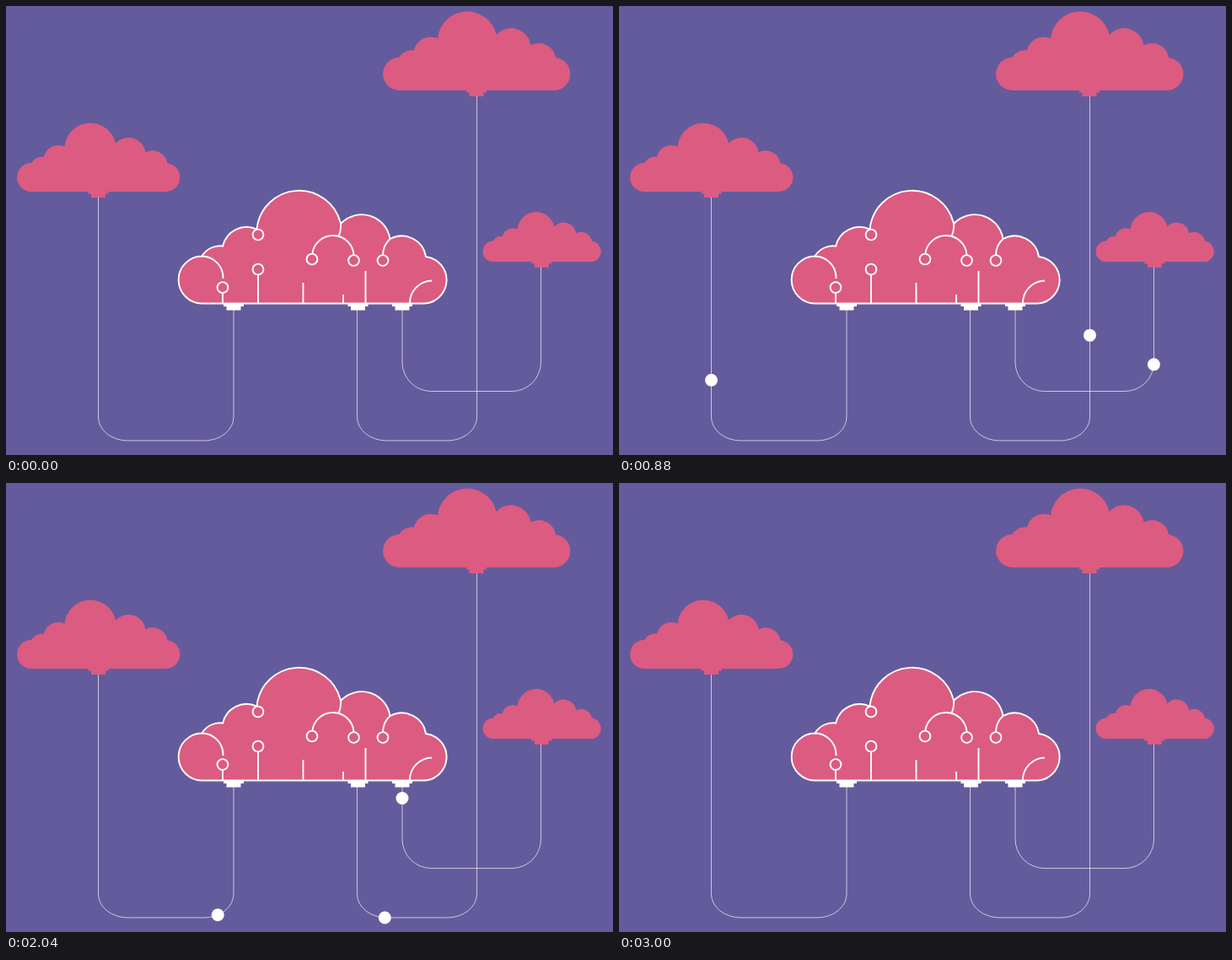
Recreate the animation shown at these times as an HTML page. Size 720 px wide and 532 px high, loop 8000 ms.

```html
<!DOCTYPE html>
<html lang="en">
<head>
<meta charset="utf-8">
<title>Connected clouds</title>
<style>
  html, body { margin: 0; height: 100%; overflow: hidden; background: #645b9c; }
  svg { display: block; width: 100vw; height: 100vh; }
  .wire { fill: none; stroke: #fff; stroke-opacity: .66; }
  .pink { fill: #dc5b81; }
  .white { fill: #fff; }
  .ink { fill: none; stroke: #fff; stroke-width: 1.9; }
  .node { fill: #dc5b81; stroke: #fff; stroke-width: 1.9; }
</style>
</head>
<body>
<svg viewBox="0 0 720 532">
  <defs>
    <path id="cloud" d="M233 352.5A28 28 0 0 1 232.3 296.5A25 25 0 0 1 257.2 284.5A29 29 0 0 1 297.5 264.5A50.5 50.5 0 0 1 397 258A34 34 0 0 1 455.5 276A29 29 0 0 1 498 297A27.85 27.85 0 0 1 494 352.5Z"/>
    <path id="plug" d="M-12 0H12V4H8.5V8.5H-8.5V4H-12Z"/>
  </defs>
  <rect width="720" height="532" fill="#645b9c"/>
  <g id="wires"></g>
  <g id="dots"></g>
  <g id="small" class="pink"></g>
  <use href="#cloud" class="node"/>
  <path class="ink" d="M232.3 296.5A25.5 25.5 0 0 1 257.5 323M257 340V352M299 318V352M352.5 328V352M400 342V352M426.5 314V352
    M363.3 294A24.7 24.7 0 0 1 412.5 295M397 258Q397.8 266 394.5 273M455.5 276Q447.5 283 447 295M479 352A26.5 26.5 0 0 1 505 325.5"/>
  <g id="nodes"></g>
  <g id="plugs" class="white"></g>
</svg>
<script>
const LOOP = 8000;
const $ = id => document.getElementById(id);

function add(parent, tag, attrs) {
  const el = document.createElementNS('http://www.w3.org/2000/svg', tag);
  for (const k in attrs) el.setAttribute(k, attrs[k]);
  return parent.appendChild(el);
}

// Satellite clouds: left edge, top edge, scale, plug x, plug y
[[13, 138.5, .608, 109.5, 218.5], [447, 6.3, .699, 558, 98.5], [565.5, 244, .441, 635.3, 301.3]]
  .forEach(([x, y, s, px, py]) => {
    add($('small'), 'use', { href: '#cloud', transform: `translate(${x} ${y}) scale(${s}) translate(-204.5 -218.5)` });
    add($('small'), 'use', { href: '#plug', x: px, y: py });
  });

[[257, 333.5], [299, 271], [299, 312], [363, 300], [412.5, 301.5], [447, 301.5]]
  .forEach(([cx, cy]) => add($('nodes'), 'circle', { cx, cy, r: 6.4, class: 'node' }));

[270, 417.5, 470].forEach(x => add($('plugs'), 'use', { href: '#plug', x, y: 352 }));

// U-shaped wire, both ends hidden behind clouds
function wire(x1, y1, x2, floor, rx, ry) {
  const dir = Math.sign(x2 - x1), sweep = dir > 0 ? 0 : 1, bend = floor - ry;
  return `M${x1} ${y1}V${bend}A${rx} ${ry} 0 0 ${sweep} ${x1 + dir * rx} ${floor}` +
    `H${x2 - dir * rx}A${rx} ${ry} 0 0 ${sweep} ${x2} ${bend}V280`;
}

// Three eased legs per dot: down, across, up. times in ms, stops along the wire
const runs = [
  { shape: [109.5, 170, 270, 515, 35, 28], times: [100, 1200, 2060, 3200], stops: [8, 341, 474, 665] },
  { shape: [558.5, 20, 416.5, 515, 35, 28], times: [100, 1200, 2060, 3200], stops: [3, 464, 591, 831] },
  { shape: [634.5, 260, 470, 456.5, 34.5, 34.5], times: [100, 900, 1700, 2400], stops: [4, 165, 336, 499] }
];

for (const run of runs) {
  run.path = add($('wires'), 'path', { class: 'wire', d: wire(...run.shape) });
  run.dot = add($('dots'), 'circle', { class: 'white', r: 7.5 });
}

function ease(t, from, to) {
  const u = Math.min(1, Math.max(0, (t - from) / (to - from)));
  return u * u * (3 - 2 * u);
}

function travel({ times, stops }, t) {
  let s = stops[0];
  for (let i = 1; i < stops.length; i++) {
    s += (stops[i] - stops[i - 1]) * ease(t, times[i - 1], times[i]);
  }
  return s;
}

function draw(t) {
  for (const run of runs) {
    const p = run.path.getPointAtLength(travel(run, t));
    run.dot.setAttribute('cx', p.x);
    run.dot.setAttribute('cy', p.y);
  }
}

const start = performance.now();
function tick() {
  draw((performance.now() - start) % LOOP);
  requestAnimationFrame(tick);
}
tick();
</script>
</body>
</html>
```
